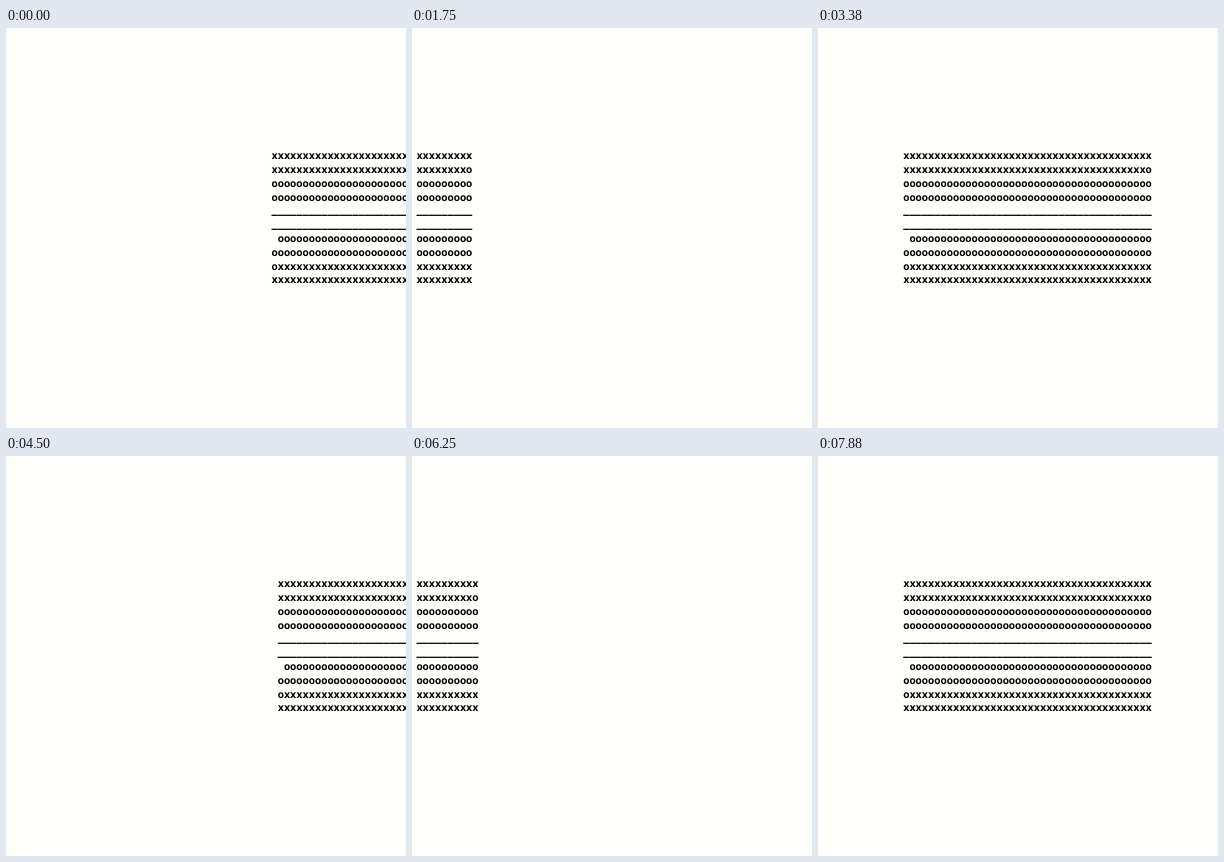
Recreate the animation shown at these times as an HTML page. Size 400x400 px, loop 8000 ms.

```html
<!DOCTYPE html>
<html lang="en">
<head>
<meta charset="utf-8">
<title>Scrolling text block</title>
<style>
  html, body { margin: 0; width: 100%; height: 100%; overflow: hidden; background: #fefefb; }
  svg { display: block; width: 400px; height: 400px; }
  text {
    font: bold 10.37px "Noto Sans Mono", "DejaVu Sans Mono", monospace;
    fill: #000;
    white-space: pre;
    text-rendering: geometricPrecision;
  }
</style>
</head>
<body>
<svg id="stage" viewBox="0 0 400 400"></svg>
<script>
const LOOP = 8000;
const WIDTH = 40;
const LEFT = 4.4;
const BASELINE = 131.2;
const LINE = 13.8;

const fill = ch => ch.repeat(WIDTH);
const rows = [
  fill("x"),
  "x".repeat(WIDTH - 1) + "o",
  fill("o"),
  fill("o"),
  fill("_"),
  fill("_"),
  " " + "o".repeat(WIDTH - 1),
  fill("o"),
  "o" + "x".repeat(WIDTH - 1),
  fill("x")
];

// Each pass from left to right: [tick, first column]
const passes = [
  [[0, 42], [7, 65]],
  [[12, -38], [14, -31], [18, -18], [25, 6], [27, 13], [32, 29], [36, 43], [39, 54], [42, 64]],
  [[48, -37], [54, -17], [56, -9], [61, 6], [63, 13]]
];

const stage = document.getElementById("stage");
const lines = rows.map((_, i) => {
  const line = document.createElementNS("http://www.w3.org/2000/svg", "text");
  line.setAttribute("x", LEFT);
  line.setAttribute("y", BASELINE + i * LINE);
  return stage.appendChild(line);
});

// Eight ticks per second, counted in hundredths
const tickAt = ms => Math.floor(Math.floor(ms / 10) / 12.5);

function columnAt(tick) {
  for (const pass of passes) {
    for (let i = 1; i < pass.length; i++) {
      const [t0, c0] = pass[i - 1];
      const [t1, c1] = pass[i];
      if (tick >= t0 && tick <= t1) {
        return Math.round(c0 + (c1 - c0) * (tick - t0) / (t1 - t0));
      }
    }
  }
  return -WIDTH;
}

let shown = null;
function draw(ms) {
  const column = columnAt(tickAt(ms % LOOP));
  if (column === shown) return;
  shown = column;
  const indent = " ".repeat(Math.max(0, column));
  const cut = Math.max(0, -column);
  lines.forEach((line, i) => {
    line.textContent = column < 64 ? indent + rows[i].slice(cut) : "";
  });
}

const start = performance.now();
function loop() {
  draw(performance.now() - start);
  requestAnimationFrame(loop);
}
loop();
</script>
</body>
</html>
```
